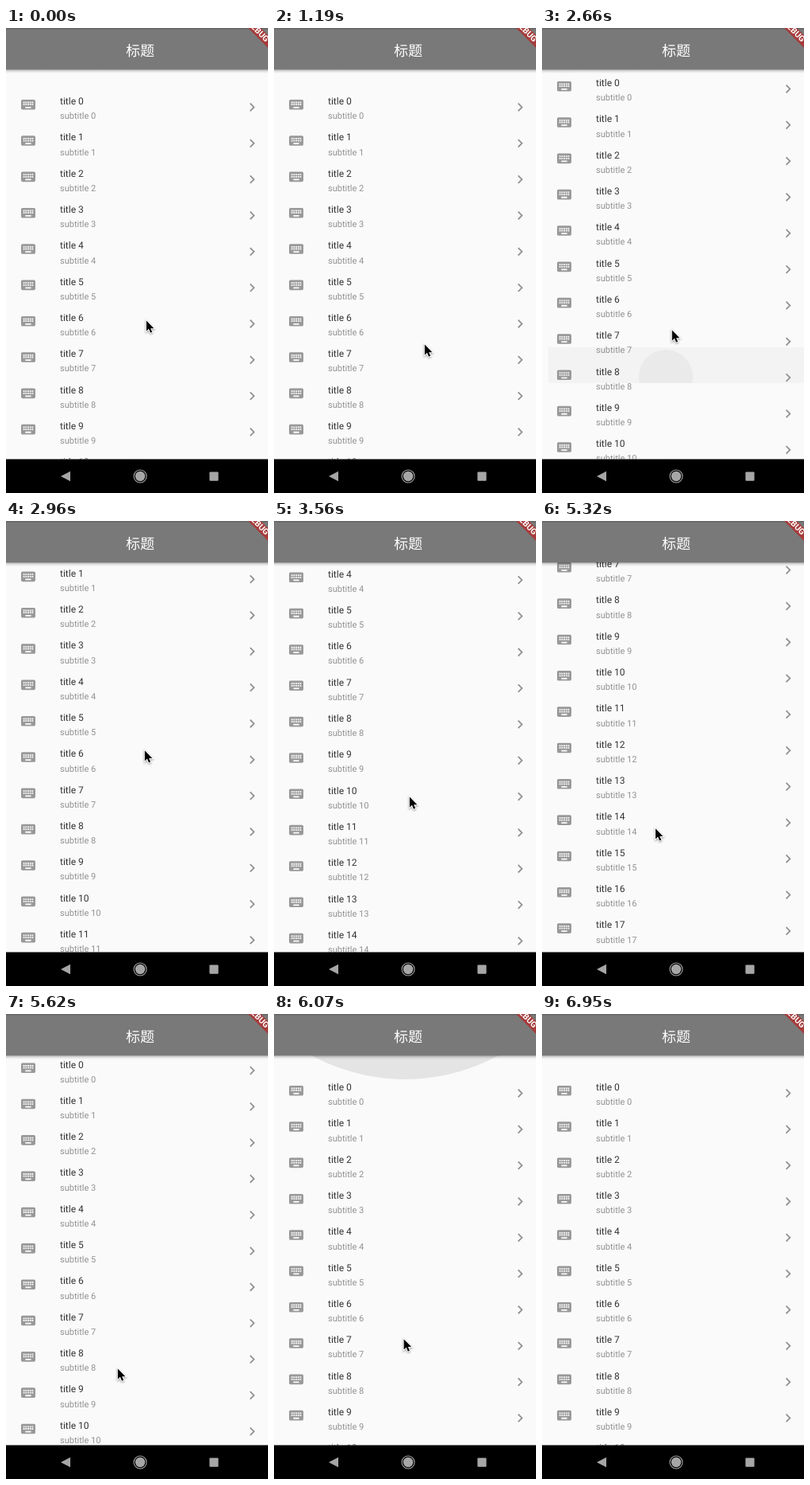
Write an HTML page that moves like this. It is 330 px wide and 584 px high and loops after 7.72 s.

```html
<!DOCTYPE html>
<html lang="zh">
<head>
<meta charset="utf-8">
<title>List</title>
<style>
  html, body { margin: 0; width: 100%; height: 100%; overflow: hidden; background: #fafafa; }
  svg { display: block; width: 330px; height: 584px; }
  text { font-family: Roboto, sans-serif; text-rendering: geometricPrecision; }
  .title { font-size: 12px; fill: #343434; }
  .subtitle { font-size: 11px; fill: #929292; }
  .heading { font: 18px "Noto Sans CJK SC", "Noto Sans CJK", sans-serif; fill: #fff; text-anchor: middle; }
  .debug { font-size: 10.4px; font-weight: 700; fill: #fff; text-anchor: end; }
  #cursor { filter: drop-shadow(0 1px 1px rgba(0, 0, 0, .4)); }
</style>
</head>
<body>
<svg viewBox="0 0 330 584">
  <defs>
    <path id="keyboard" fill="#999" d="M20 5H4c-1.1 0-1.99.9-1.99 2L2 17c0 1.1.9 2 2 2h16c1.1 0 2-.9 2-2V7c0-1.1-.9-2-2-2zm-9 3h2v2h-2V8zm0 3h2v2h-2v-2zM8 8h2v2H8V8zm0 3h2v2H8v-2zm-1 2H5v-2h2v2zm0-3H5V8h2v2zm9 7H8v-2h8v2zm0-4h-2v-2h2v2zm0-3h-2V8h2v2zm3 3h-2v-2h2v2zm0-3h-2V8h2v2z"/>
    <path id="chevron" fill="#929292" d="M10 6L8.59 7.41 13.17 12l-4.58 4.59L10 18l6-6z"/>
    <linearGradient id="shadow" x2="0" y2="1">
      <stop stop-opacity=".38"/>
      <stop offset=".4" stop-opacity=".12"/>
      <stop offset="1" stop-opacity="0"/>
    </linearGradient>
    <clipPath id="viewport"><path d="M0 52H330V541.5H0z"/></clipPath>
    <clipPath id="tile"><path d="M8 401H330V446H8z"/></clipPath>
  </defs>

  <rect width="330" height="584" fill="#fafafa"/>
  <g id="ink" clip-path="url(#tile)">
    <rect x="8" y="401" width="322" height="45" fill="#f3f3f3"/>
    <circle id="splash" cx="156" cy="438" fill="#eaeaea"/>
  </g>
  <g clip-path="url(#viewport)">
    <g id="list"></g>
    <g fill="#9e9e9e" opacity=".25">
      <circle id="glowTop" cx="165" r="247"/>
      <circle id="glowBottom" cx="165" r="247"/>
    </g>
  </g>

  <rect y="52" width="330" height="5" fill="url(#shadow)"/>
  <rect width="330" height="52" fill="#797979"/>
  <rect width="330" height="1.5" fill="#666"/>
  <text class="heading" x="169" y="34.8">标题</text>
  <path d="M305 0H321L330 9V25z" fill="#a63c3c"/>
  <text class="debug" transform="translate(327 18) rotate(45)">DEBUG</text>

  <rect y="541.5" width="330" height="42.5"/>
  <g fill="#a6a6a6">
    <path d="M69 563L81 556.7V569.3z"/>
    <circle cx="169" cy="563" r="6.2"/>
    <circle cx="169" cy="563" r="8" fill="none" stroke="#a6a6a6" stroke-width="1.1"/>
    <rect x="256.3" y="557.5" width="11.2" height="11.2" rx="1"/>
  </g>
  <g id="cursor">
    <path transform="translate(.8 1.6) scale(.82)" d="M0 0V16l3.7-3.5 2.6 6 2.6-1.1-2.5-5.7h5.2z" stroke="#fff" stroke-width="2.4" paint-order="stroke"/>
  </g>
</svg>

<script>
const LOOP = 7720, ROW_HEIGHT = 45.33, ROWS = 20, STEP = 148;
const GLOW_RADIUS = 247, GLOW_HEIGHT = 38;
const $ = id => document.getElementById(id);

// The picture advances in even steps inside these spans and rests between them.
const activeSpans = [[0, 1190], [1630, 5030], [5320, 6220], [6510, 6950]];

// Press, drag and release points of the pointer: time, x, y.
const pointerStops = [
  [1190, 189, 396], [2510, 156, 437], [2660, 163, 378], [3060, 176, 270], [3550, 170, 345],
  [3850, 176, 240], [4290, 132, 430], [4740, 148, 224], [5620, 140, 444], [6220, 167, 400], [6950, 335, 590]
];
// Where the list comes to rest: time, offset.
const scrollStops = [
  [2510, 0], [2660, 23], [3550, 206.7], [3850, 436], [5200, 436], [5620, 28.5], [5770, 0]
];

const progress = (time, start, end) => Math.min(1, Math.max(0, (time - start) / (end - start)));
const smooth = p => p * p * (3 - 2 * p);
const mix = (a, b, p) => a + (b - a) * p;

function snap(elapsed) {
  const [start, end] = activeSpans.filter(span => span[0] <= elapsed).pop();
  const steps = Math.round((end - start) / STEP);
  return start + (end - start) * Math.floor(progress(elapsed, start, end) * steps + 0.05) / steps;
}

function easeThrough(stops, time) {
  const next = Math.max(1, stops.findIndex(stop => stop[0] > time));
  const [from, to] = time >= stops[stops.length - 1][0] ? stops.slice(-2) : [stops[next - 1], stops[next]];
  const p = smooth(progress(time, from[0], to[0]));
  return from.slice(1).map((value, i) => mix(value, to[i + 1], p));
}

function pointerAt(time) {
  if (time >= 1190) return easeThrough(pointerStops, time);
  // One wide loop over the list.
  const p = smooth(time / 1190), turn = 2 * Math.PI * p;
  return [
    mix(176, 189, p) + 66 * Math.sin(turn) - 20 * Math.sin(turn / 2),
    mix(366, 396, p) - 132 * (1 - Math.cos(turn))
  ];
}

const glowAt = (time, start, end) => GLOW_HEIGHT * Math.sin(Math.PI * progress(time, start, end));
const show = (element, visible) => element.setAttribute('visibility', visible ? 'visible' : 'hidden');
const move = (element, x, y) => element.setAttribute('transform', `translate(${x} ${y})`);

$('list').innerHTML = Array.from({ length: ROWS }, (_, i) => `
  <g transform="translate(0 ${i * ROW_HEIGHT})">
    <use href="#keyboard" transform="translate(17.2 85.4) scale(.9)"/>
    <text class="title" x="68" y="96">title ${i}</text>
    <text class="subtitle" x="68" y="114.2">subtitle ${i}</text>
    <use href="#chevron" transform="translate(299.2 88.7) scale(.9)"/>
  </g>`).join('');

function draw(elapsed) {
  const time = snap(elapsed);

  move($('cursor'), ...pointerAt(time));
  show($('cursor'), time < 6950);
  move($('list'), 0, -easeThrough(scrollStops, time)[0]);

  show($('ink'), time > 2500 && time < 2800);
  $('splash').setAttribute('r', mix(18, 34, progress(time, 2510, 2660)));

  $('glowTop').setAttribute('cy', 52 - GLOW_RADIUS + glowAt(time, 5700, 6220));
  $('glowBottom').setAttribute('cy', 541.5 + GLOW_RADIUS - glowAt(time, 4300, 5030));
}

const start = performance.now();
(function loop() {
  draw((performance.now() - start) % LOOP);
  requestAnimationFrame(loop);
})();
</script>
</body>
</html>
```
